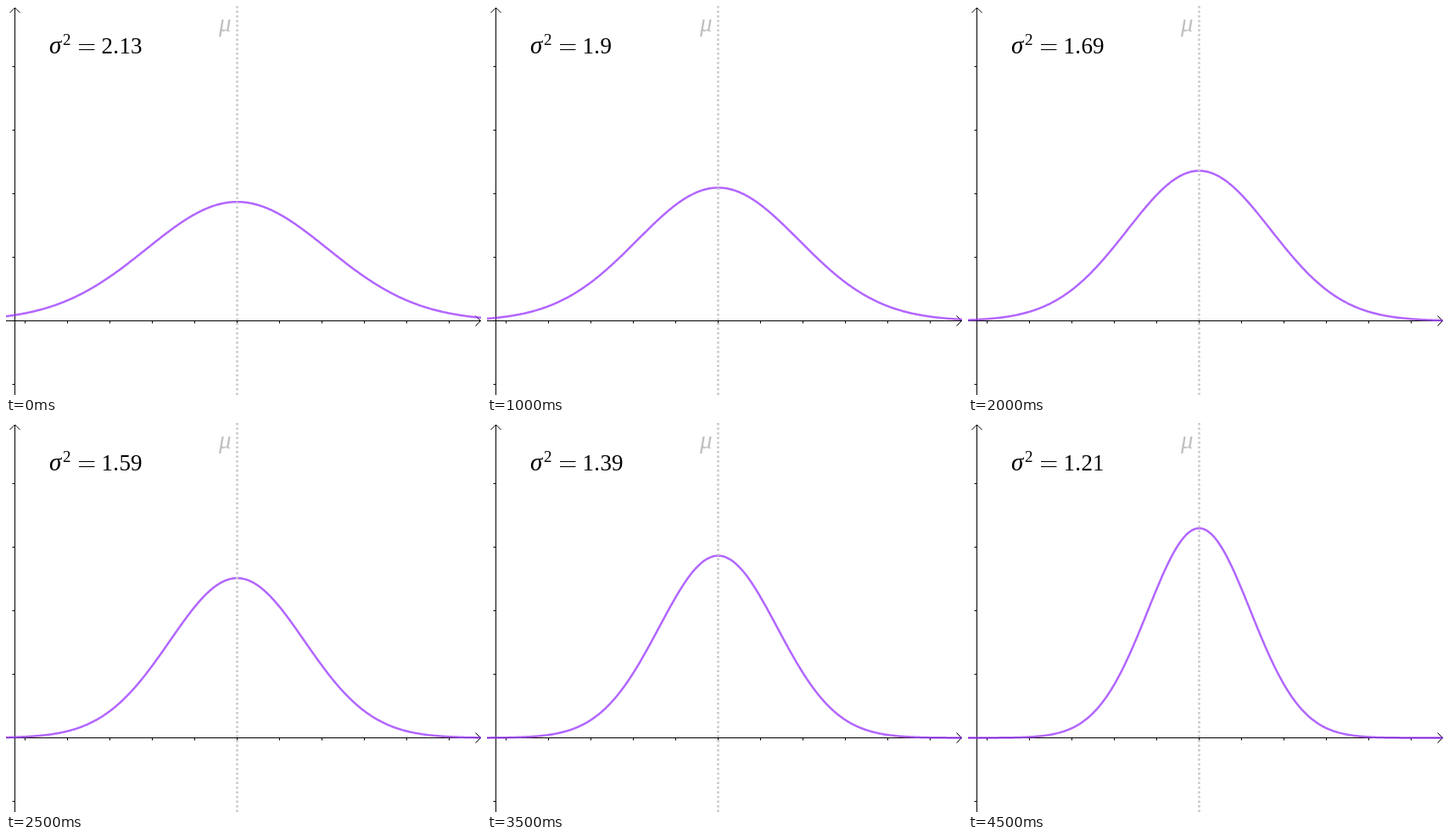
Animation of 560 by 459 pixels, one loop 5000 ms. Source, as an HTML page with a canvas:

```html
<!DOCTYPE html>
<html lang="en">
<head>
<meta charset="utf-8">
<title>Normal curve with shrinking variance</title>
<style>
  html, body { margin: 0; width: 100%; height: 100%; overflow: hidden; background: #fff; }
  canvas { display: block; }
</style>
</head>
<body>
<canvas id="stage" width="560" height="459"></canvas>
<script>
const W = 560, H = 459;
const AXIS_X = 10.5, AXIS_Y = 371.5, MEAN_X = 272.5;
const UNIT_X = 50, UNIT_Y = 750;
const STEP_MS = 500, STEPS = 10;
const SERIF = '"Liberation Serif", "Times New Roman", serif';
const ctx = document.getElementById('stage').getContext('2d');

function path(points, color, width) {
  ctx.beginPath();
  points.forEach(([x, y]) => ctx.lineTo(x, y));
  ctx.strokeStyle = color;
  ctx.lineWidth = width;
  ctx.stroke();
}

function text(str, x, y, size, color = '#000', style = '') {
  ctx.font = `${style} ${size}px ${SERIF}`;
  ctx.fillStyle = color;
  ctx.fillText(str, x, y);
}

function drawAxes() {
  const line = (...points) => path(points, '#000', 1);
  line([0, AXIS_Y], [W, AXIS_Y]);
  line([AXIS_X, 2], [AXIS_X, H]);
  line([W - 6.5, AXIS_Y - 6], [W - 0.5, AXIS_Y], [W - 6.5, AXIS_Y + 6]);
  line([AXIS_X - 6, 8], [AXIS_X, 2], [AXIS_X + 6, 8]);
  for (let x = 22.5; x < W - 10; x += UNIT_X) line([x, AXIS_Y], [x, AXIS_Y + 3]);
  for (let y = 71.5; y < H; y += 75) line([AXIS_X - 3, y], [AXIS_X, y]);
}

function drawCurve(variance) {
  const peak = UNIT_Y / (variance * Math.sqrt(2 * Math.PI));
  const points = [];
  for (let x = -2; x <= W + 2; x++) {
    const z = (x - MEAN_X) / (UNIT_X * variance);
    points.push([x, AXIS_Y - peak * Math.exp(-z * z / 2)]);
  }
  path(points, 'rgba(153, 51, 255, 0.75)', 2.5);
}

function drawMean() {
  ctx.setLineDash([2.5, 3]);
  path([[MEAN_X, 0], [MEAN_X, H]], '#c8c8c8', 2.5);
  ctx.setLineDash([]);
  text('μ', 251, 29.5, 29, '#c0c0c0', 'italic');
}

function drawLabel(variance) {
  text('σ', 51, 55.5, 29, '#000', 'italic');
  text('2', 67, 46, 19);
  // wide, thin equals sign
  path([[86, 45.5], [104.5, 45.5]], '#000', 1.1);
  path([[86, 51.5], [104.5, 51.5]], '#000', 1.1);
  const [whole, decimals] = String(+variance.toFixed(2)).split('.');
  text(whole, 112.5, 55.5, 27);
  text('.', 126.3, 55.5, 27);
  text(decimals, 133.5, 55.5, 27);
}

function draw(now) {
  const step = Math.floor(now / STEP_MS) % STEPS;
  const variance = (1.46 - 0.04 * step) ** 2;
  ctx.fillStyle = '#fff';
  ctx.fillRect(0, 0, W, H);
  drawAxes();
  drawCurve(variance);
  drawMean();
  drawLabel(variance);
}

let start;
function tick(now) {
  start ??= now;
  draw(now - start);
  requestAnimationFrame(tick);
}
draw(0);
requestAnimationFrame(tick);
</script>
</body>
</html>
```
